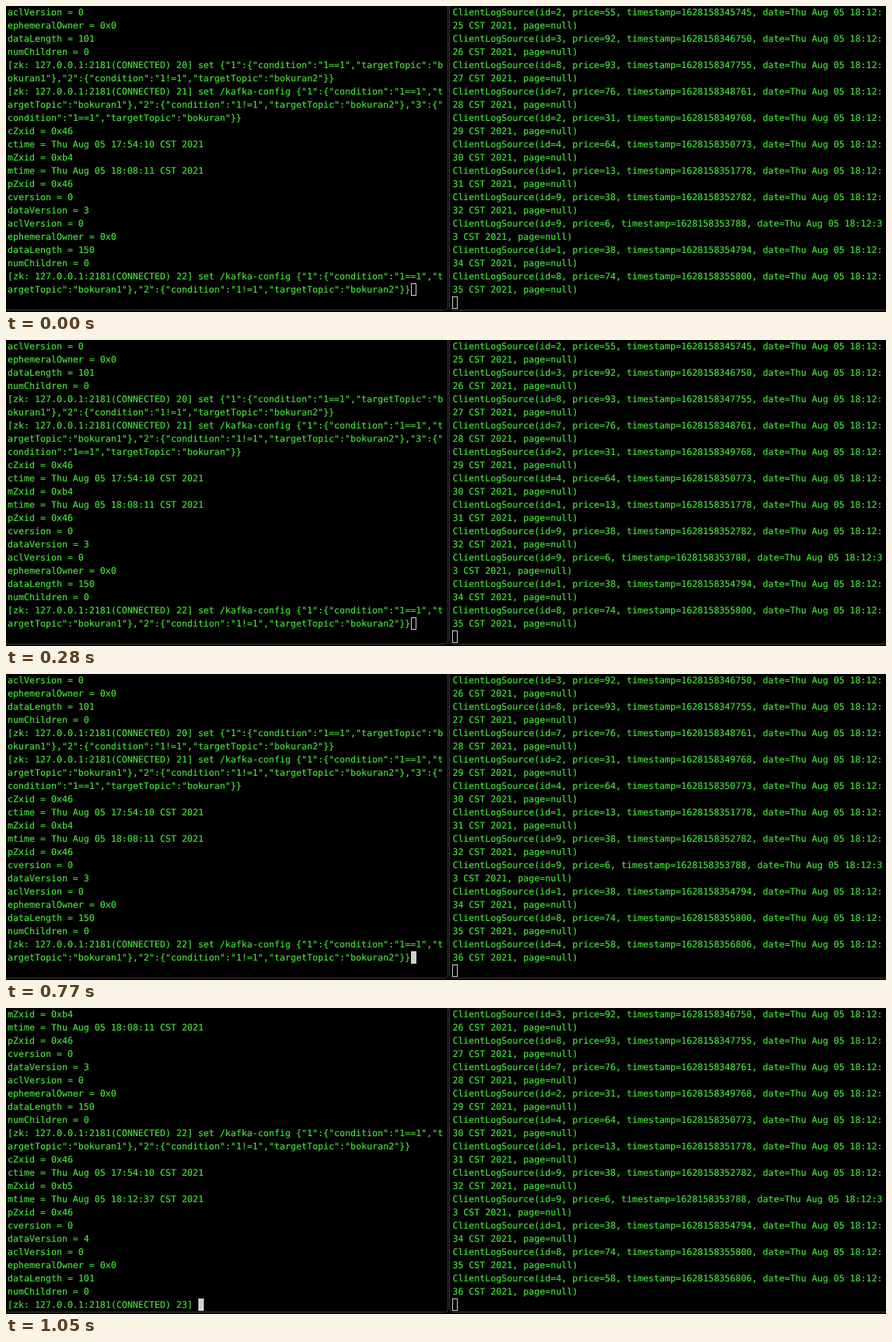
Write an HTML page that moves like this. It is 1130x394 px and loops after 2.59 s.

```html
<!DOCTYPE html>
<html lang="en">
<head>
<meta charset="utf-8">
<title>Terminal panes</title>
<style>
  html, body { margin: 0; width: 100%; height: 100%; overflow: hidden; background: #000; }
  svg { display: block; }
  text {
    font: 11.628px "DejaVu Sans Mono", monospace;
    text-rendering: geometricPrecision;
    white-space: pre;
    fill: #46e83a;
    stroke: #46e83a;
    stroke-width: 0.15;
  }
  .frame { fill: none; stroke: #3c3c3c; }
  .cursor { fill: none; stroke: #d0d0d0; }
  .cursor.full { fill: #d0d0d0; }
</style>
</head>
<body>
<svg width="1130" height="394">
  <path class="frame" d="M0 391.5H563.5Q567.5 391.5 567.5 387.5V0M569.5 0V387.5Q569.5 391.5 573.5 391.5H1130"/>
  <g id="left"></g>
  <g id="right"></g>
  <rect class="cursor" id="prompt" width="6" height="15"/>
  <rect class="cursor" x="573.5" y="374.5" width="6" height="15"/>
</svg>
<script>
const LOOP = 2590, ROW = 17, COL = 7;
const FOCUS = 420, LOG = 770, ENTER = 1050;
const $ = id => document.getElementById(id);

const wrap = (lines, cols) => lines.flatMap(s => s.match(new RegExp(`.{1,${cols}}`, "g")));

const rule = (key, test, topic) => `"${key}":{"condition":"${test}","targetTopic":"${topic}"}`;
const one = rule(1, "1==1", "bokuran1");
const two = rule(2, "1!=1", "bokuran2");
const three = rule(3, "1==1", "bokuran");

const prompt = (n, cmd = "") => `[zk: 127.0.0.1:2181(CONNECTED) ${n}] ${cmd}`;
const tail = length => ["aclVersion = 0", "ephemeralOwner = 0x0", `dataLength = ${length}`, "numChildren = 0"];
const stat = (mZxid, time, version, length) => [
  "cZxid = 0x46",
  "ctime = Thu Aug 05 17:54:10 CST 2021",
  `mZxid = ${mZxid}`,
  `mtime = Thu Aug 05 ${time} CST 2021`,
  "pZxid = 0x46",
  "cversion = 0",
  `dataVersion = ${version}`,
  ...tail(length)
];

const before = wrap([
  ...tail(101),
  prompt(20, `set {${one},${two}}`),
  prompt(21, `set /kafka-config {${one},${two},${three}}`),
  ...stat("0xb4", "18:08:11", 3, 150),
  prompt(22, `set /kafka-config {${one},${two}}`)
], 80);
const after = [...before, ...stat("0xb5", "18:12:37", 4, 101), prompt(23)].slice(11);

// id, price, last six digits of the timestamp
const log = wrap([
  [2, 55, 345745], [3, 92, 346750], [8, 93, 347755], [7, 76, 348761],
  [2, 31, 349768], [4, 64, 350773], [1, 13, 351778], [9, 38, 352782],
  [9, 6, 353788], [1, 38, 354794], [8, 74, 355800], [4, 58, 356806]
].map(([id, price, ms], i) =>
  `ClientLogSource(id=${id}, price=${price}, timestamp=1628158${ms}, ` +
  `date=Thu Aug 05 18:12:${25 + i} CST 2021, page=null)`), 79);

function print(pane, x, lines) {
  pane.replaceChildren(...lines.map((line, i) => {
    const text = document.createElementNS("http://www.w3.org/2000/svg", "text");
    text.setAttribute("x", x);
    text.setAttribute("y", i * ROW + 12);
    text.textContent = line;
    return text;
  }));
}

function moveCursor(col, row) {
  $("prompt").setAttribute("x", 2.5 + col * COL);
  $("prompt").setAttribute("y", row * ROW + 0.5);
}

let shown = "";
function draw(now) {
  const t = now % LOOP;
  const focus = t >= FOCUS, logged = t >= LOG, entered = t >= ENTER;
  const state = [focus, logged, entered].join();
  if (state !== shown) {
    shown = state;
    print($("left"), 2, entered ? after : before);
    print($("right"), 573.4, logged ? log.slice(2) : log.slice(0, 22));
    $("prompt").classList.toggle("full", focus);
    entered ? moveCursor(35, 22) : moveCursor(74, 21);
  }
}

const start = performance.now();
function tick() {
  draw(performance.now() - start);
  requestAnimationFrame(tick);
}
tick();
</script>
</body>
</html>
```
